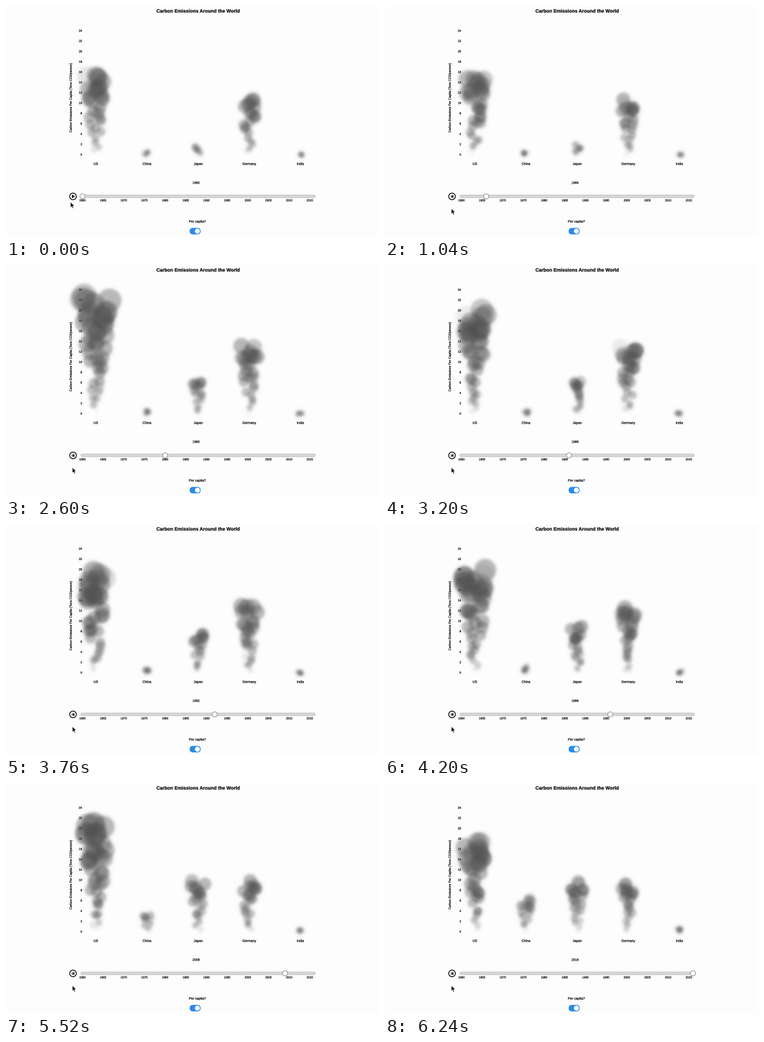
Recreate the animation shown at these times as a matplotlib script. Size 600x371 px, loop 6280 ms.

```python
import numpy as np
import matplotlib.pyplot as plt
from matplotlib.animation import FuncAnimation
from matplotlib.patches import Circle, FancyBboxPatch, PathPatch, Polygon, Rectangle
from matplotlib.textpath import TextPath
from matplotlib.transforms import Affine2D

W, H, DPI = 600, 371, 100
PX = 72 / DPI
FRAMES, STEP = 157, 40
LOOP = FRAMES * STEP
BG = "#fdfdfd"

fig = plt.figure(figsize=(W / DPI, H / DPI), dpi=DPI, facecolor=BG)
ax = fig.add_axes([0, 0, 1, 1])
ax.axis("off")


def text_path(x, y, s, size, weight="normal", angle=0, align=.5):
    """Outline of s, centred on its cap height, for a y axis that points down."""
    path = TextPath((0, 0), s, size=size,
                    prop={"family": "Liberation Sans", "weight": weight})
    box = path.get_extents()
    shift = Affine2D().translate(-box.x0 - align * box.width, -.36 * size)
    return shift.scale(1, -1).rotate_deg(angle).translate(x, y).transform_path(path)


def label(*args, stroke=.2, **kw):
    return ax.add_patch(PathPatch(text_path(*args, **kw), fc="black", ec="black",
                                  lw=stroke * PX))


def pill(x0, y0, x1, y1, **kw):
    r = (y1 - y0) / 2
    box = FancyBboxPatch((x0 + r, y0 + r), x1 - x0 - 2 * r, 1e-3,
                         boxstyle=f"round,pad={r}", **kw)
    return ax.add_patch(box)


def ramp(t, a, b):
    s = np.clip((t - a) / (b - a), 0, 1)
    return s * s * (3 - 2 * s)


# Tons per person that each plume reaches at time t
PLUMES = {
    "US": lambda t: (15.7 + 6.5 * ramp(t, 1100, 2400) - 2.8 * ramp(t, 2500, 3200)
                     + 1.7 * ramp(t, 3400, 4800) - 3.5 * ramp(t, 5500, LOOP)),
    "China": lambda t: .4 + 6.3 * (t / LOOP) ** 6,
    "Japan": lambda t: 1.7 + 5.2 * ramp(t, 900, 2100) + 2.9 * ramp(t, 3000, 4600),
    "Germany": lambda t: 10.8 + 2.3 * ramp(t, 1000, 2100) - 3.3 * ramp(t, 3900, 5700),
    "India": lambda t: .05 + .65 * (t / LOOP) ** 6,
}
CENTERS = 144.5 + 82.3 * np.arange(len(PLUMES))
UNIT, BASE = 8.29, 238.5
SLOTS, LIFE = 44, 920
CYCLES = LOOP // LIFE + 2
rng = np.random.default_rng(12)
SIDE, REACH, DRIFT = (rng.uniform(a, b, (len(PLUMES), SLOTS, CYCLES))
                      for a, b in ((-1, 1), (.84, 1.04), (-1.8, 1.8)))

X0, X1, Y0, Y1 = 95, 500, 20, 262
SMOKE = 0x50 / 255


def puff(clear, x, y, r, alpha):
    """Dim the light through a soft disc."""
    m = int(r + 10)
    xa, xb = max(int(x) - m, X0), min(int(x) + m, X1)
    ya, yb = max(int(y) - m, Y0), min(int(y) + m, Y1)
    gx = np.arange(xa, xb) + .5
    gy = np.arange(ya, yb)[:, None] + .5
    d = np.hypot(gx - x, gy - y)
    clear[ya - Y0:yb - Y0, xa - X0:xb - X0] *= 1 - alpha / (1 + np.exp((d - r) / 1.4))


def smoke(t):
    clear = np.ones((Y1 - Y0, X1 - X0))
    for c, reach in enumerate(PLUMES.values()):
        top = reach(t)
        count = 4 + 1.7 * top
        for k in range(int(np.ceil(count))):
            cycle, age = divmod(t / LIFE + k * .618034 % 1, 1)
            i = c, k, int(cycle)
            v = top * REACH[i] * (1 - (1 - age) ** 1.6)
            r = 4 + .68 * v
            fade = min(1, count - k, age * 12, (1 - age) * 16)
            x = CENTERS[c] + SIDE[i] * (4.5 + .82 * v)
            y = BASE - UNIT * v + DRIFT[i]
            puff(clear, x, y, r, .4 * fade * min(1, .6 + r / 25))
    rgba = np.full(clear.shape + (4,), SMOKE)
    rgba[..., 3] = 1 - clear
    return rgba


label(309, 7.8, "Carbon Emissions Around the World", 7.7, weight="bold")
label(104, 147.5, "Carbon Emissions Per Capita (Tons CO2/person)", 5.1, angle=-90)
for n in range(0, 25, 2):
    label(122.2, 238.5 - UNIT * n, str(n), 4.7, align=1)
for x, name in zip(CENTERS, PLUMES):
    label(x, 253.3, name, 5.4)

cloud = ax.imshow(smoke(0), extent=(X0, X1, Y1, Y0), aspect="auto",
                  interpolation="nearest", zorder=4)

# Slider
YEAR_W = 6.65
YEAR = 305.8, 283.7
year_text = label(*YEAR, "1960", 5.2)
pill(120.5, 303.7, 497.5, 307.9, fc="#d8d8d8", ec="#b0b0b0", lw=.7 * PX)
for n in range(0, 60, 5):
    label(123 + YEAR_W * n, 312, str(1960 + n), 4.6)
thumb = ax.add_patch(Circle((123, 305.8), 4.1, fc="white", ec="#777777",
                            lw=.8 * PX, zorder=5))

# Play and pause
ax.add_patch(Circle((107.8, 305.8), 5.3, fc="white", ec="black", lw=1.3 * PX))
play = ax.add_patch(Polygon([(106, 303), (106, 308.6), (111, 305.8)], fc="black"))
bars = [ax.add_patch(Rectangle((x, 303.5), 1.4, 4.6, fc="black"))
        for x in (105.8, 108.4)]

# Switch
label(308, 345.8, "Per capita?", 5.4)
pill(295.4, 356.4, 313.1, 366.8, fc="#2a8ae8", ec="none")
ax.add_patch(Circle((307.9, 361.6), 4, fc="white", ec="none"))

ARROW = np.array([(0, 0), (0, 9), (2, 7.2), (3.5, 10.4), (5, 9.7),
                  (3.6, 6.6), (6.3, 6.4)])
cursor = ax.add_patch(Polygon(ARROW, fc="black", ec="white", lw=.7 * PX, zorder=6))

ax.set_xlim(0, W)
ax.set_ylim(H, 0)


def year_at(t):
    """Years since 1960, ticking a little faster towards the middle."""
    return int(np.interp(t, [400, 1960, 4200, LOOP], [0, 14.7, 36.5, 56.9]))


def draw(i):
    t = i * STEP
    n = year_at(t)
    cloud.set_data(smoke(t))
    year_text.set_path(text_path(*YEAR, str(1960 + n), 5.2))
    thumb.center = 123 + YEAR_W * n, 305.8
    playing = t >= 320
    play.set_visible(not playing)
    for b in bars:
        b.set_visible(playing)
    s = ramp(t, 120, 520)
    cursor.set_xy(ARROW + (103.8 + 3 * s, 314.8 + 10.4 * s))
    return []


anim = FuncAnimation(fig, draw, frames=FRAMES, interval=STEP, repeat=True,
                     repeat_delay=0, blit=False)
plt.show()
```
